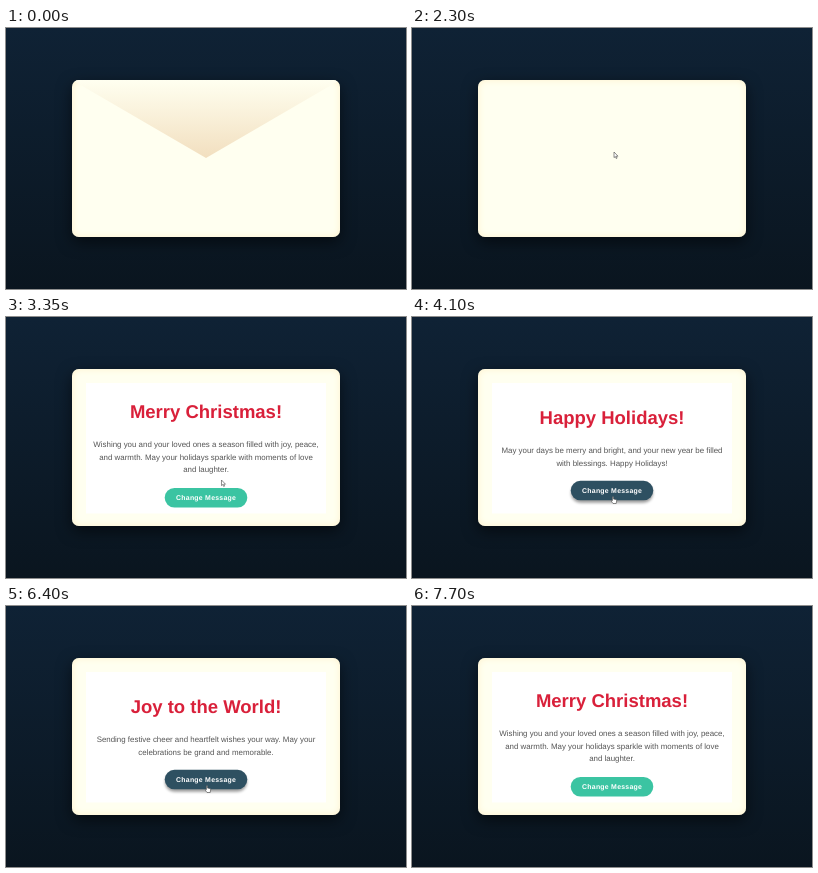
An HTML page that plays this animation: 400x261 px, repeating every 7.75 s.

```html
<!DOCTYPE html>
<html lang="en">
<head>
<meta charset="utf-8">
<title>Greeting envelope</title>
<style>
  html, body { margin: 0; width: 100%; height: 100%; overflow: hidden; }
  body { background: linear-gradient(#0f2235, #0a151f); position: relative; }
  #envelope {
    position: absolute; left: 66px; top: 52px; width: 268px; height: 157px;
    border-radius: 7px; overflow: hidden; background: #fffff0;
    box-shadow: 0 5px 15px rgba(0, 0, 0, .55), inset 0 0 7px #fff2cc;
  }
  svg { display: block; position: absolute; left: 0; top: 0; }
  text {
    font-family: "Liberation Sans", Arial, sans-serif;
    text-anchor: middle; text-rendering: geometricPrecision;
  }
  #title { font-size: 18.5px; font-weight: bold; fill: #d9203a; }
  .line { font-size: 7.92px; fill: #555; }
  #label { font-size: 6.93px; font-weight: bold; letter-spacing: .25px; fill: #fff; }
</style>
</head>
<body>
<div id="envelope">
  <svg width="268" height="157" viewBox="66 52 268 157">
    <defs>
      <linearGradient id="paper" x1="0" y1="0" x2="0" y2="1">
        <stop offset="0" stop-color="#fffff0"/>
        <stop offset="1" stop-color="#f2dfbf"/>
      </linearGradient>
      <filter id="blur" x="-20%" y="-60%" width="140%" height="220%">
        <feGaussianBlur stdDeviation="1.7"/>
      </filter>
    </defs>
    <path id="flap" d="M66 52H334L200 130Z" fill="url(#paper)"/>
    <g id="card">
      <rect x="80" y="66" width="240" height="130.5" fill="#fff"/>
      <text id="title" x="200"></text>
      <text class="line" x="200"></text>
      <text class="line" x="200"></text>
      <text class="line" x="200"></text>
      <g id="button">
        <rect id="shade" x="159" y="2.5" width="82" height="19.5" rx="9.75" filter="url(#blur)"/>
        <rect id="pill" x="158.7" width="82.6" height="19.5" rx="9.75"/>
        <text id="label" x="200.1" y="12.3">Change Message</text>
      </g>
    </g>
  </svg>
</div>
<svg width="400" height="261">
  <g id="cursor" fill="#fff" stroke="#444" stroke-width=".6" stroke-linejoin="round">
    <path id="arrow" d="M0 0V5.6L1.3 4.5 2.2 6.5 3.1 6.1 2.2 4.2H4Z"/>
    <path id="hand" d="M-.6 .4Q0-.4 .6 .4V2.6L3 3.1Q3.8 3.3 3.7 4.2L3.2 7H0L-1.9 4.4Q-1.7 3.5-.6 4.2Z"/>
  </g>
</svg>
<script>
const LOOP = 7750;
const $ = id => document.getElementById(id);
const lines = [...document.querySelectorAll('.line')];

const messages = [
  ['Merry Christmas!',
    'Wishing you and your loved ones a season filled with joy, peace,',
    'and warmth. May your holidays sparkle with moments of love',
    'and laughter.'],
  ['Happy Holidays!',
    'May your days be merry and bright, and your new year be filled',
    'with blessings. Happy Holidays!'],
  ['Joy to the World!',
    'Sending festive cheer and heartfelt wishes your way. May your',
    'celebrations be grand and memorable.']
];

// Pointer stops: time, x, y
const stops = [
  [100, 396, 3], [800, 198, 127], [1700, 198, 127], [2200, 202, 124],
  [2750, 202, 124], [3350, 215.5, 163], [3620, 201, 179.5],
  [6650, 201, 179.5], [7100, 225, 4]
];

const ease = p => p * p * (3 - 2 * p);
const ramp = (t, start, length) => ease(Math.min(1, Math.max(0, (t - start) / length)));
const mix = (a, b, p) => a + (b - a) * p;
const between = (t, a, b) => t >= a && t < b;
const move = (el, x, y) => el.setAttribute('transform', `translate(${x} ${y})`);
const show = (el, on) => el.style.display = on ? '' : 'none';

function pointer(t) {
  const i = stops.findIndex((s, n) => n && t < s[0]);
  if (t < stops[0][0] || i < 0) return null;
  const [a, b] = [stops[i - 1], stops[i]];
  const p = ramp(t, a[0], b[0] - a[0]);
  return [mix(a[1], b[1], p), mix(a[2], b[2], p)];
}

function drawCard(t) {
  $('card').setAttribute('opacity', ramp(t, 2400, 650));
  const [title, ...body] = messages[between(t, 3800, 5100) ? 1 : between(t, 5100, 6450) ? 2 : 0];
  const top = body.length === 3 ? 0 : 6.2;
  const hover = ramp(t, 3480, 280) - ramp(t, 6730, 280);

  $('title').textContent = title;
  $('title').setAttribute('y', 100.6 + top);
  lines.forEach((line, i) => {
    line.textContent = body[i] || '';
    line.setAttribute('y', 129.9 + top + 12.75 * i);
  });
  move($('button'), 0, 171 - top - hover);
  const rgb = [[59, 196, 162], [46, 80, 97]];
  $('pill').setAttribute('fill', `rgb(${rgb[0].map((c, i) => mix(c, rgb[1][i], hover))})`);
  $('shade').setAttribute('opacity', .4 * hover);
}

function draw(t) {
  const lift = 2 * (ramp(t, 400, 300) - ramp(t, 1650, 300));
  $('envelope').style.transform = `translateY(${-lift}px)`;
  const fold = Math.cos(Math.PI / 2 * ramp(t, 1650, 550));
  $('flap').setAttribute('transform', `translate(0 52) scale(1 ${fold}) translate(0 -52)`);
  drawCard(t);

  const at = pointer(t);
  show($('cursor'), at);
  if (at) move($('cursor'), ...at);
  const overLink = between(t, 400, 1700) || between(t, 3480, 6760);
  show($('hand'), overLink);
  show($('arrow'), !overLink);
}

const start = performance.now();
function frame() {
  draw((performance.now() - start) % LOOP);
  requestAnimationFrame(frame);
}
frame();
</script>
</body>
</html>
```
